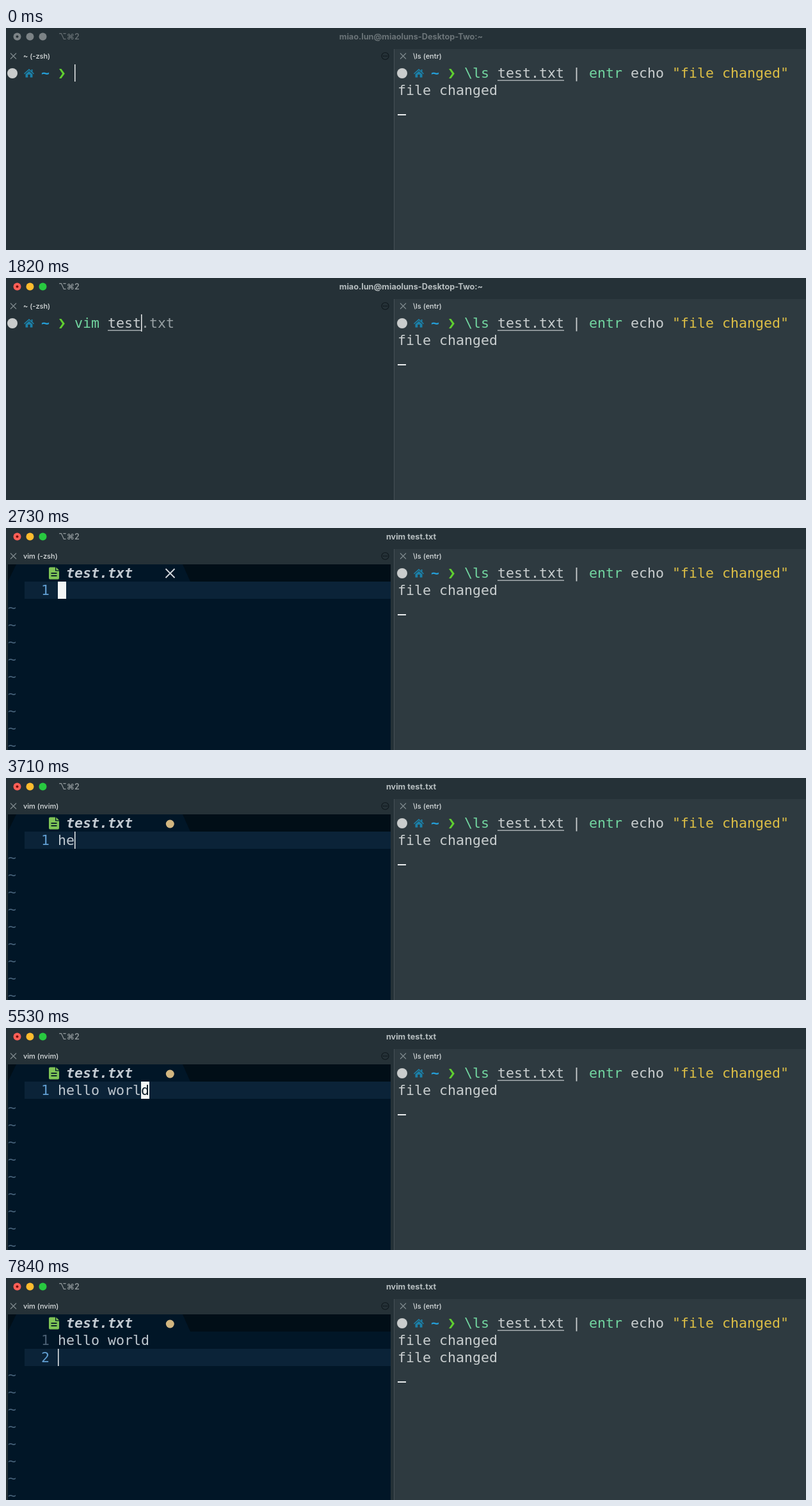
An HTML page with a canvas for the animation above (8 s loop, 1250 by 348 pixels).

```html
<!DOCTYPE html>
<html lang="en">
<head>
<meta charset="utf-8">
<style>
html, body { margin: 0; width: 100%; height: 100%; overflow: hidden; background: #253137; }
canvas { display: block; }
</style>
</head>
<body>
<canvas id="stage" width="1250" height="348"></canvas>
<script>
const ctx = document.getElementById('stage').getContext('2d');
const LOOP = 8000, CELL = 13, ROW = 27, TOP = 57, LEFT = 3, RIGHT = 612;
const MONO = '"DejaVu Sans Mono", monospace';
const UI = 'Inter, "DejaVu Sans", sans-serif';
const WHITE = '#c9cecf', GREEN = '#72d6a0', YELLOW = '#dcbe45';

// Moments in ms
const FOCUS = 630, ENTER = 2590, CLEAR = 2660, EDITOR = 2730, INSERT = 3080,
      RENAME = 3360, ESCAPE = 5530, COLON = 5740, SAVE = 6090, NEW_LINE = 7070;
const COMMAND = 'vim test.txt', GREETING = 'hello world';
const COMMAND_KEYS = [1050, 1120, 1260, 1400, 1470, 1610, 1680, 1820, 1960, 2100, 2240, 2380];
const GREETING_KEYS = [3640, 3710, 3850, 3990, 4200, 4480, 4690, 4830, 4970, 5040, 5250];

const typed = (keys, t) => keys.filter(k => k <= t).length;
const rowTop = row => TOP + row * ROW;

function rect(x, y, w, h, color) {
  ctx.fillStyle = color;
  ctx.fillRect(x, y, w, h);
}

function disc(x, y, r, color) {
  ctx.fillStyle = color;
  ctx.beginPath();
  ctx.arc(x, y, r, 0, 7);
  ctx.fill();
}

function shape(path, x, y, color) {
  ctx.save();
  ctx.translate(x, y);
  ctx.fillStyle = color;
  ctx.fill(new Path2D(path), 'evenodd');
  ctx.restore();
}

function cross(x, y, r, width, color) {
  ctx.strokeStyle = color;
  ctx.lineWidth = width;
  ctx.stroke(new Path2D(`M${x - r} ${y - r}L${x + r} ${y + r}M${x + r} ${y - r}L${x - r} ${y + r}`));
}

function label(text, x, y, font, color, align = 'left') {
  ctx.font = `${font} ${UI}`;
  ctx.textAlign = align;
  ctx.fillStyle = color;
  ctx.fillText(text, x, y);
}

function mono(text, x, row, color, style = '') {
  ctx.font = `${style} 21.6px ${MONO}`;
  ctx.textAlign = 'left';
  ctx.fillStyle = color;
  ctx.fillText(text, x, rowTop(row) + 21);
}

const bar = (x, row) => rect(x, rowTop(row), 1.5, ROW, '#e8ebec');
const block = (x, row) => rect(x, rowTop(row), CELL, ROW, '#f3f5f5');
const underscore = (x, row) => rect(x, rowTop(row) + 24, CELL, 2, '#e8ebec');
const underline = (x, chars) => rect(x, TOP + 24.5, chars * CELL, 1.3, '#b9c0c2');

function prompt(x) {
  disc(x + 7, 71, 8, '#c9cccc');
  shape('M0 -7L3.5 -3.8V-6H5.5V-2L8 .3L7 1.5L0 -4.8L-7 1.5L-8 .3Z'
      + 'M0 -3.6L5.5 1.4V6.5H1.7V2H-1.7V6.5H-5.5V1.4Z', x + 33, 71, '#1b80a8');
  mono('~', x + 4 * CELL, 0, '#249fd8', 'bold');
  shape('M0 0H3.4L8.8 7.5L3.4 15H0L5 7.5Z', x + 80, 64, '#60cf30');
}

function titleBar(t) {
  const focused = t >= FOCUS;
  const lights = focused ? ['#ff5f57', '#febc2e', '#28c840'] : Array(3).fill('#7c8386');
  lights.forEach((color, i) => disc(17.5 + i * 20, 13.5, 6, color));
  disc(17.5, 13.5, 2, focused ? '#7a0f0a' : '#2a3439');
  label('⌥⌘2', 82, 18, '600 12.5px', focused ? '#8f979a' : '#646d71');
  label(t < ENTER ? 'miao.lun@miaoluns-Desktop-Two:~' : 'nvim test.txt',
        633, 18.3, 'bold 12.7px', focused ? '#b8bfc1' : '#6b7478', 'center');
}

function paneTab(x, name) {
  cross(x, 44, 4.5, 1.2, '#7f898d');
  label(name, x + 15.5, 48, '500 11px', '#dce0e1');
}

function shell(t) {
  if (t >= CLEAR) return underscore(LEFT, 0);
  prompt(LEFT);
  const x = LEFT + 8 * CELL, count = typed(COMMAND_KEYS, t);
  if (count) {
    mono(COMMAND.slice(0, Math.min(count, 3)), x, 0, GREEN);
    mono(COMMAND.slice(4, count), x + 4 * CELL, 0, WHITE);
    mono(COMMAND.slice(count), x + count * CELL, 0, '#98a0a3');
    if (count > 4) underline(x + 4 * CELL, count - 4);
  }
  if (t < ENTER) bar(x + count * CELL, 0);
  else underscore(LEFT, 1);
}

function editor(t) {
  const count = typed(GREETING_KEYS, t), current = t >= NEW_LINE ? 2 : 1;
  const textX = LEFT + 6 * CELL, lastX = textX + 10 * CELL;
  rect(LEFT, TOP, 598, 291, '#011627');
  rect(LEFT, TOP, 598, ROW, '#010e17');
  shape('M13 0H273L285 27H0Z', LEFT, TOP, '#011627');
  shape('M2 0H10V6H16V17Q16 19 14 19H2Q0 19 0 17V2Q0 0 2 0ZM11.3 0L16 4.7H11.3Z'
      + 'M3.5 8.5V10.2H12.5V8.5ZM3.5 12.5V14.2H12.5V12.5Z', 67, 61.5, '#7fc456');
  mono('test.txt', LEFT + 7 * CELL, 0, '#c5ccd3', 'italic bold');
  const dirty = count && (t < SAVE || t >= NEW_LINE);
  if (dirty) disc(256.3, 72, 6.5, '#d2b680');
  else cross(256.5, 71, 7, 1.8, '#d5dade');

  rect(29, rowTop(current), 572, ROW, '#0b2338');
  for (let line = 1; line <= current; line++)
    mono(line, LEFT + 4 * CELL, line, line === current ? '#619fd2' : '#4b6074');
  for (let row = current + 1; row < 11; row++) mono('~', LEFT, row, '#46627a');
  mono(GREETING.slice(0, count), textX, 1, '#bfc8d0');

  if (t < INSERT) block(textX, 1);
  else if (t < ESCAPE) bar(textX + count * CELL, 1);
  else if (t >= NEW_LINE) bar(textX, 2);
  else if (t < COLON || t >= SAVE) {
    block(lastX, 1);
    mono('d', lastX, 1, '#0b1a26');
  }
}

function watcher(t) {
  const at = col => RIGHT + col * CELL;
  prompt(RIGHT);
  mono('\\ls', at(8), 0, GREEN);
  mono('test.txt', at(12), 0, WHITE);
  underline(at(12), 8);
  mono('|', at(21), 0, WHITE);
  mono('entr', at(23), 0, GREEN);
  mono('echo', at(28), 0, WHITE);
  mono('"file changed"', at(33), 0, YELLOW);
  const messages = t >= SAVE ? 2 : 1;
  for (let row = 1; row <= messages; row++) mono('file changed', RIGHT, row, WHITE);
  underscore(RIGHT, messages + 2 - 1);
}

function draw(t) {
  rect(0, 0, 1250, 348, '#253137');
  rect(607, 33, 643, 315, '#2e3a40');
  rect(606, 33, 1, 315, '#465157');
  titleBar(t);
  paneTab(11.5, t < ENTER ? '~ (-zsh)' : t < RENAME ? 'vim (-zsh)' : 'vim (nvim)');
  paneTab(620.5, '\\ls (entr)');
  ctx.strokeStyle = '#10191e';
  ctx.lineWidth = 1.2;
  ctx.beginPath();
  ctx.arc(592.5, 44, 5.5, 0, 7);
  ctx.stroke();
  for (const dx of [-2.6, 0, 2.6]) disc(592.5 + dx, 44, 0.9, '#10191e');
  if (t < EDITOR) shell(t);
  else editor(t);
  watcher(t);
}

const start = performance.now();
function tick() {
  draw((performance.now() - start) % LOOP);
  requestAnimationFrame(tick);
}
tick();
</script>
</body>
</html>
```
